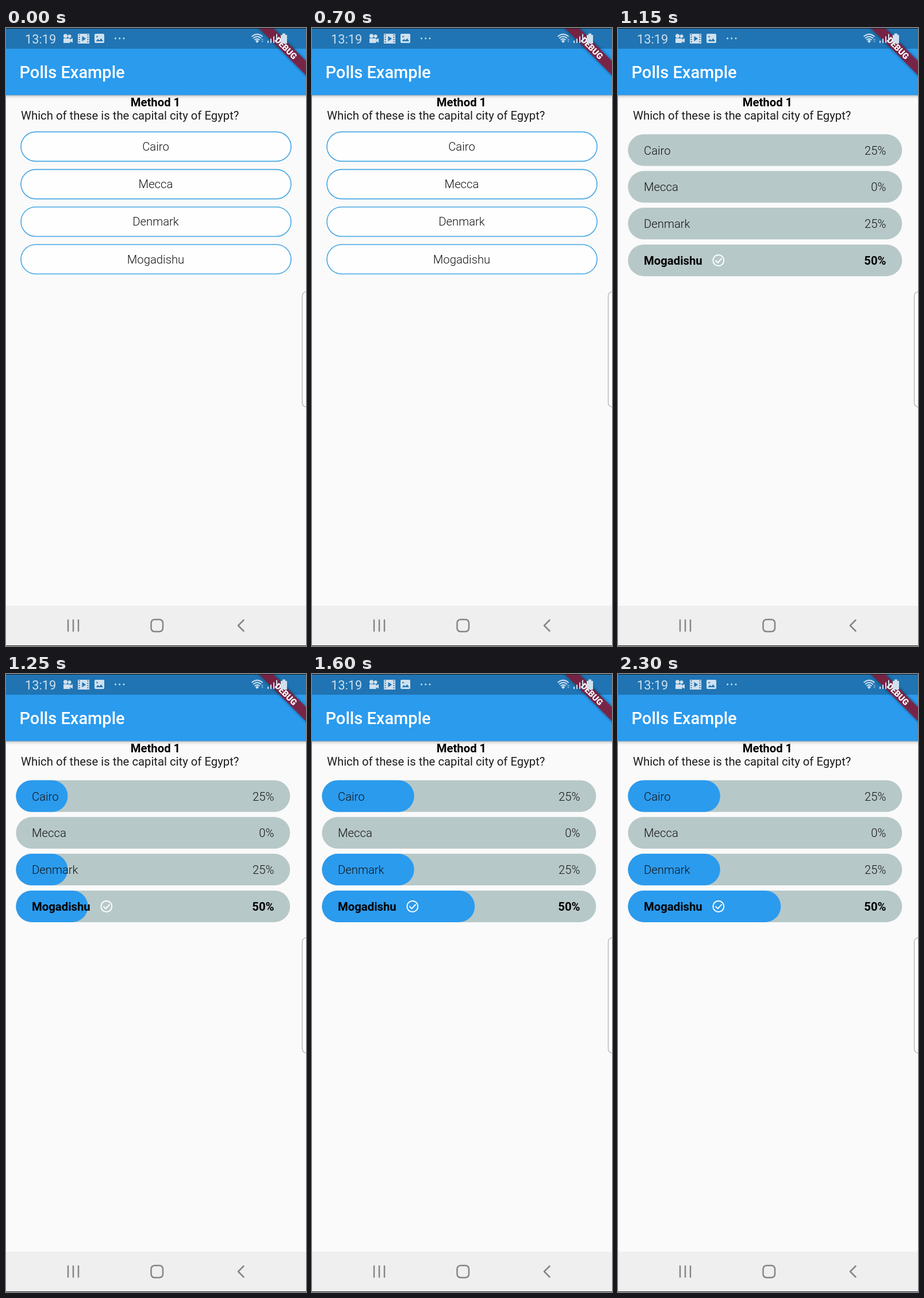
Animation, 522 px wide and 1073 px high, one loop 2.35 s. Source, as an HTML page:

```html
<!DOCTYPE html>
<html lang="en">
<head>
<meta charset="utf-8">
<title>Polls Example</title>
<style>
  html, body { margin: 0; height: 100%; overflow: hidden; background: #fafafa; }
  svg { display: block; width: 522px; height: 1073px; font: 20.3px Roboto, sans-serif; }
  .light { font-weight: 300; fill: #151515; }
  .bold { font-weight: 700; fill: #000; }
  .mid { text-anchor: middle; }
  .end { text-anchor: end; }
  .line { fill: none; stroke-linecap: round; stroke-linejoin: round; }
</style>
</head>
<body>
<svg viewBox="0 0 522 1073">
  <defs>
    <linearGradient id="shade" x2="0" y2="1">
      <stop offset="0" stop-color="#000" stop-opacity=".32"/>
      <stop offset=".4" stop-color="#000" stop-opacity=".1"/>
      <stop offset="1" stop-color="#000" stop-opacity="0"/>
    </linearGradient>
    <filter id="blur" x="-20%" y="-60%" width="140%" height="220%"><feGaussianBlur stdDeviation="2.5"/></filter>
  </defs>
  <rect width="522" height="1073" fill="#fafafa"/>

  <!-- app bar -->
  <rect y="116" width="522" height="7" fill="url(#shade)"/>
  <rect width="522" height="116.5" fill="#2b9bee"/>
  <rect width="522" height="36" fill="#2074b3"/>
  <text x="23.5" y="87" font-size="29" font-weight="500" fill="#fff">Polls Example</text>

  <!-- debug ribbon -->
  <g transform="translate(522) rotate(45)">
    <rect x="-70" y="40.6" width="140" height="17.4" fill="#000" opacity=".5" filter="url(#blur)"/>
    <rect x="-70" y="40.6" width="140" height="17.4" fill="#851f40" opacity=".88"/>
    <text class="mid" y="54.6" font-size="14.8" font-weight="900" fill="#fff">DEBUG</text>
  </g>

  <!-- status bar -->
  <g fill="#cfe0ee">
    <text x="33" y="26.5" font-size="21.8">13:19</text>
    <circle cx="103.5" cy="13.8" r="3.6"/>
    <circle cx="110.5" cy="14.2" r="3"/>
    <path d="M100 18h11.500v2l4.500-2.500v8l-4.500-2.500v3H100z"/>
    <path d="M125 10h20v17h-20z"/>
    <path d="M154 12q0-2 2-2h13q2 0 2 2v12q0 2-2 2h-13q-2 0-2-2z"/>
    <circle cx="190.500" cy="18" r="1.500"/><circle cx="197.700" cy="18" r="1.500"/><circle cx="205" cy="18" r="1.500"/>
    <path d="M455 22h2v4h-2zM460 18.500h2v7.500h-2zM465 14.500h2v11.500h-2zM470 10.500h2v15.500h-2z"/>
    <path d="M478 12h3v-2.500h5v2.500h3v15h-11z"/>
    <path d="M434 23l3-3 3 3-3 3z"/>
    <path d="M444 21l2-2.500 2 2.500zM444 22.500h4l-2 2.500z" opacity=".6"/>
  </g>
  <path d="M132.500 14v9l6.500-4.500zM156.500 23l3.500-4 2.500 2.500 3-3.500 3.500 5z" fill="#2074b3"/>
  <path d="M127.500 11v16M142.500 11v16" stroke="#2074b3" stroke-width="1.800" stroke-dasharray="2"/>
  <circle cx="158.500" cy="15" r="1.300" fill="#2074b3"/>
  <path class="line" d="M428 14.500q9-7.500 18 0M430.500 17.500q6.500-5.500 13 0M433 20.500q4-3.500 8 0" stroke="#cfe0ee" stroke-width="1.700"/>
  <rect width="522" height="1" fill="#111a22"/>

  <!-- question -->
  <text class="mid bold" x="260" y="135.500">Method 1</text>
  <text x="26" y="158.500" fill="#1c1c1c">Which of these is the capital city of Egypt?</text>
  <g id="ask"></g>
  <g id="result"></g>

  <!-- edge handle -->
  <rect x="515.500" y="458" width="30" height="200" rx="7" fill="#fdfdfd" stroke="#b9b9b9" stroke-width="1.500"/>

  <!-- navigation bar -->
  <rect y="1003" width="522" height="70" fill="#efefef"/>
  <g class="line" stroke="#858585" stroke-width="2.500">
    <path d="M108 1028v19M117 1028v19M126 1028v19"/>
    <rect x="252.500" y="1027" width="20.500" height="21" rx="6"/>
    <path d="M413.500 1028l-9.500 9.500 9.500 9.500"/>
  </g>
  <rect y="1072" width="522" height="1" fill="#222"/>
</svg>
<script>
const LOOP = 2350, STEP = 50, VOTE = 1150, GROW = 300;
const options = [["Cairo", 25], ["Mecca", 0], ["Denmark", 25], ["Mogadishu", 50]];
const chosen = 3;
const ask = document.getElementById("ask");
const result = document.getElementById("result");

ask.innerHTML = options.map(([name], i) => {
  const y = 180.4 + i * 65.2;
  return `<rect x="26" y="${y}" width="470" height="51" rx="25.5" fill="#fefefe" stroke="#46a7e4" stroke-width="1.6"/>
    <text class="mid light" x="260.5" y="${y + 32.6}">${name}</text>`;
}).join("");

result.innerHTML = options.map(([name, share], i) => {
  const y = 184.5 + i * 63.8;
  const style = i === chosen ? "bold" : "light";
  const bar = (color, id) => `<rect class="${id}" x="17.3" y="${y}" width="477" height="55" rx="27.5" fill="${color}"/>`;
  return bar("#b7c8c8", "track") + bar("#2b9bee", "fill") +
    `<text class="${style}" x="45" y="${y + 35}">${name}</text>
    <text class="${style} end" x="466.5" y="${y + 35}">${share}%</text>`;
}).join("") +
  `<g class="line" stroke="#fff" stroke-width="1.9"><circle cx="174.8" cy="403.5" r="9.5"/>
  <path d="M170 404l3.500 3.500 6.500-7"/></g>`;

const fills = result.querySelectorAll(".fill");

function draw(now) {
  const t = Math.floor(now % LOOP / STEP) * STEP;
  const voted = t >= VOTE;
  ask.style.display = voted ? "none" : "";
  result.style.display = voted ? "" : "none";
  const grown = Math.max(0, Math.min(1, (t - VOTE) / GROW));
  fills.forEach((fill, i) => {
    const part = grown * options[i][1] / 100;
    fill.setAttribute("width", part ? 55 + part * 422 : 0);
  });
}

const start = performance.now();
function tick() {
  draw(performance.now() - start);
  requestAnimationFrame(tick);
}
tick();
</script>
</body>
</html>
```
